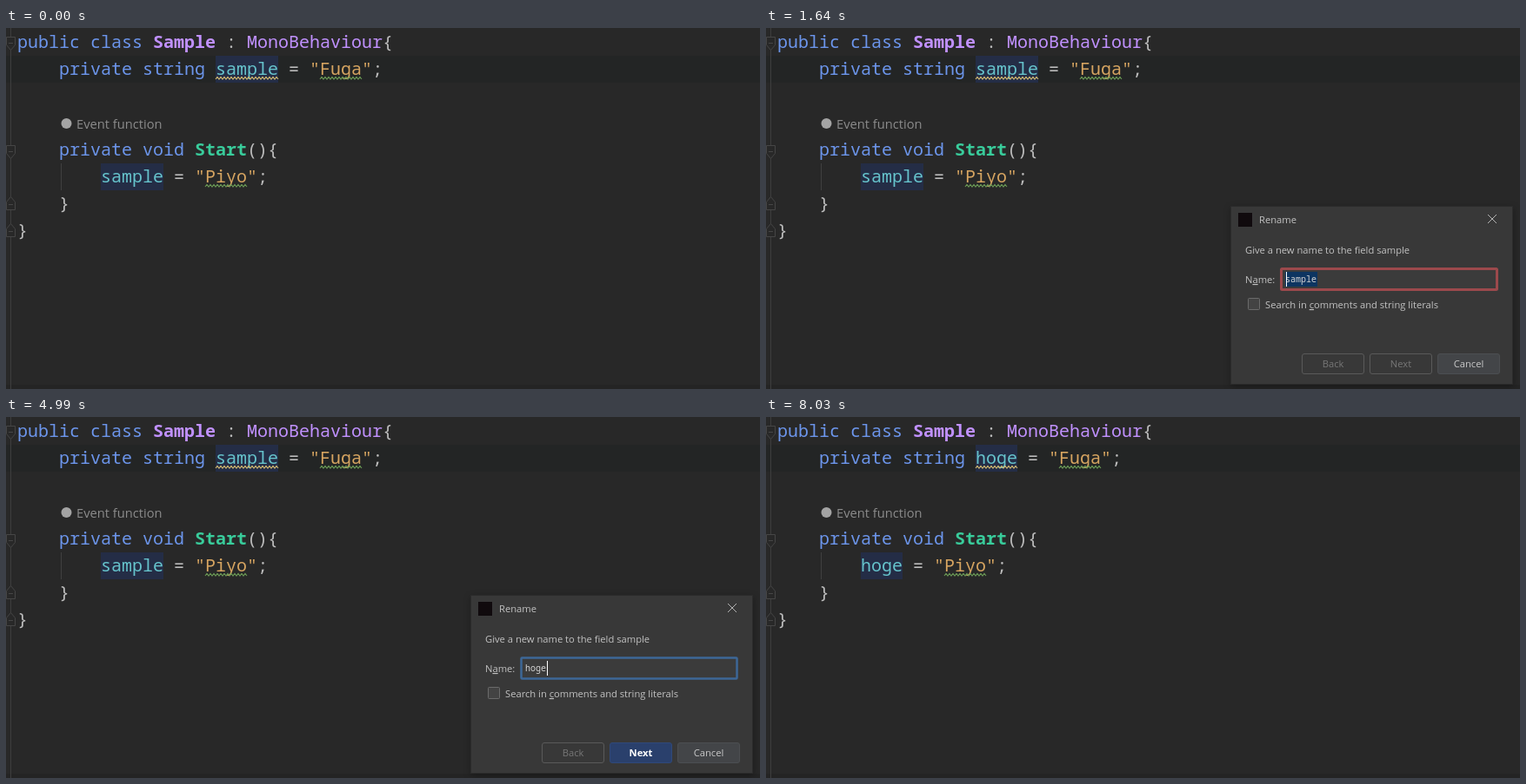
Animation, 867 px wide and 416 px high, one loop 8.34 s. Source, as an HTML page:

```html
<!DOCTYPE html>
<html lang="en">
<head>
<meta charset="utf-8">
<title>Rename refactoring</title>
<style>
  html, body { margin: 0; height: 100%; overflow: hidden; background: #282828; }
  svg { display: block; width: 100%; height: 100%; }
  text { white-space: pre; }
  .code { font: 500 20px "Noto Sans Mono", monospace; fill: #bdbdbd; }
  .kw { fill: #6c95eb; }
  .type { fill: #c191ff; }
  .method { fill: #39cc9b; }
  .field { fill: #66c3cc; }
  .str { fill: #d7a561; }
  .bold { font-weight: 700; }
  .hint { font: 14.7px "Open Sans", sans-serif; fill: #8c8c8c; }
  .ui { font: 11.2px "Open Sans", sans-serif; fill: #c2c2c2; }
  .mid { text-anchor: middle; }
  .input { font: 10px "Noto Sans Mono", monospace; fill: #d4d4d4; }
  .key { text-decoration: underline; }
  .panel { filter: drop-shadow(0 2px 4px rgba(0, 0, 0, .35)); }
</style>
</head>
<body>
<svg viewBox="0 0 867 416" preserveAspectRatio="none">
  <rect width="867" height="416" fill="#282828"/>
  <rect y="32" width="867" height="31" fill="#232525"/>
  <rect y="411" width="867" height="5" fill="#242424"/>
  <path d="M5.5 0V416" stroke="#3e3e3e"/>
  <path d="M63.5 156V187" stroke="#404040"/>
  <g id="folds" fill="#282828" stroke="#464646"></g>
  <circle cx="69.5" cy="110" r="6" fill="#a4a4a4"/>
  <text class="hint" x="81" y="116">Event function</text>
  <g id="before"></g>
  <g id="after"></g>
  <rect id="caret" x="240" y="35" width="2" height="25" fill="#fff"/>

  <g id="dialog">
    <rect class="panel" x="535" y="206" width="324" height="205" fill="#383838"/>
    <rect x="534.5" y="205.5" width="324" height="205" fill="none" stroke="#2b2b2b"/>
    <rect x="543" y="213" width="16" height="16" fill="#100a0d"/>
    <text class="ui" x="567" y="224.5">Rename</text>
    <path d="M830 215l10 10m0 -10l-10 10" stroke="#b4b4b4"/>
    <g id="form">
      <text class="ui" x="551" y="260">Give a new name to the field sample</text>
      <text class="ui" x="551" y="294">N<tspan class="key">a</tspan>me:</text>
      <rect id="box" x="592.5" y="277.5" width="248" height="24" rx="1" fill="#3b3b3b"/>
      <rect id="selection" x="597" y="281" width="37" height="17" fill="#0d3561"/>
      <text id="value" class="input" x="597" y="293"></text>
      <rect id="inputCaret" y="281" width="1" height="17" fill="#fff"/>
      <rect x="554.5" y="311.5" width="13" height="13" rx="1" fill="#434343" stroke="#6b6b6b"/>
      <text class="ui" x="574" y="323">Search in <tspan class="key">c</tspan>omments and string literals</text>
    </g>
    <g id="done">
      <text class="ui" x="547" y="363">Refactoring Succeeded</text>
      <rect x="548" y="366" width="297" height="4" fill="#1c1c1c"/>
    </g>
    <g id="buttons"></g>
  </g>
</svg>
<script>
const LOOP = 8340;
const $ = id => document.getElementById(id);
const show = (el, on) => el.setAttribute("display", on ? "inline" : "none");
const set = (el, attrs) => {
  for (const k in attrs) el.setAttribute(k, attrs[k]);
};

// Fold markers: top edge and pointing direction
const fold = (y, down) => {
  const shape = down
    ? `M.5 ${y}H10.5V${y + 9}L5.5 ${y + 15}L.5 ${y + 9}Z`
    : `M.5 ${y + 15}H10.5V${y + 6}L5.5 ${y}L.5 ${y + 6}Z`;
  return `<path d="${shape}"/><path d="M3 ${y + (down ? 7 : 9)}h5"/>`;
};
$("folds").innerHTML = fold(10.5, true) + fold(135.5, true) + fold(194.5, false) + fold(225.5, false);

const colX = col => 13 + col * 12;
const baseline = row => 23 + row * 31;

function line(row, col, parts) {
  let out = "";
  for (const [text, cls = ""] of parts) {
    out += `<text class="code ${cls}" x="${colX(col)}" y="${baseline(row)}">${text}</text>`;
    col += text.length;
  }
  return out;
}

function usage(col, row, len) {
  return `<rect x="${colX(col)}" y="${1 + row * 31}" width="${len * 12}" height="31" fill="#242d46"/>`;
}

// Zigzag underline, 4 px period
function wave(col, row, len, color) {
  const d = `M${colX(col)} ${baseline(row) + 5}` + "l2 -2.5l2 2.5".repeat(len * 3);
  return `<path d="${d}" fill="none" stroke="${color}" stroke-width="1.1"/>`;
}

function code(name) {
  const n = name.length;
  const green = "#6a9a55";
  return usage(19, 1, n) + usage(8, 5, n) +
    line(0, 0, [["public", "kw"], [" "], ["class", "kw"], [" "], ["Sample", "type bold"], [" : "], ["MonoBehaviour", "type"], ["{"]]) +
    line(1, 4, [["private", "kw"], [" "], ["string", "kw"], [" "], [name, "field"], [" = "], ['"Fuga"', "str"], [";"]]) +
    line(4, 4, [["private", "kw"], [" "], ["void", "kw"], [" "], ["Start", "method bold"], ["(){"]]) +
    line(5, 8, [[name, "field"], [" = "], ['"Piyo"', "str"], [";"]]) +
    line(6, 4, [["}"]]) + line(7, 0, [["}"]]) +
    wave(19, 1, n, "#d0b870") + wave(23 + n, 1, 4, green) + wave(12 + n, 5, 4, green);
}

$("before").innerHTML = code("sample");
$("after").innerHTML = code("hoge");

const button = (id, x, label, fill, stroke, color) =>
  `<g id="${id}"><rect x="${x + 0.5}" y="375.5" width="71" height="23" rx="2.5" fill="${fill}" stroke="${stroke}"/>` +
  `<text class="ui mid" x="${x + 36}" y="391" style="fill:${color}">${label}</text></g>`;
$("buttons").innerHTML =
  button("back", 616, "Back", "#383838", "#5a5a5a", "#777") +
  button("nextOff", 694, "Next", "#383838", "#5a5a5a", "#777") +
  button("nextOn", 694, "Next", "#2a406c", "#30497a", "#fff") +
  button("cancel", 772, "Cancel", "#434548", "#4c4f52", "#c8c8c8");
$("nextOn").lastChild.style.fontWeight = 700;

// Each row holds from its start time: [ms, opacity, scale]
const windowSteps = [
  [0, 0, 1], [1370, 0.3, 0.94], [1430, 0.66, 0.972], [1500, 0.88, 0.989], [1570, 0.97, 0.997],
  [1640, 1, 1], [6050, 0.55, 0.989], [6110, 0.2, 0.975], [6180, 0, 1]
];
const typed = [[0, "sample"], [4360, "h"], [4610, "ho"], [4790, "hog"], [4930, "hoge"]];
const editorBlink = [[240, 740], [1240, 1370], [6110, 7040], [7550, 8030]];
const inputBlink = [[1370, 1870], [2380, 2880], [3380, 3860], [4360, 5920]];

const at = (steps, t) => steps.filter(s => s[0] <= t).pop();
const within = (spans, t) => spans.some(([a, b]) => t >= a && t < b);

function render(t) {
  const [, alpha, scale] = at(windowSteps, t);
  const value = at(typed, t)[1];
  const editing = t >= 4360;
  const done = t >= 5990;

  show($("before"), !done);
  show($("after"), done);
  show($("caret"), within(editorBlink, t));

  show($("dialog"), alpha > 0);
  set($("dialog"), {
    opacity: alpha,
    transform: scale === 1 ? "" : `translate(697 308) scale(${scale}) translate(-697 -308)`
  });
  show($("form"), !done);
  show($("done"), done);
  show($("selection"), !editing);
  show($("nextOn"), editing && !done);
  show($("nextOff"), !editing || done);
  set($("box"), {
    stroke: editing ? "#3d6797" : "#9c494c",
    "stroke-width": editing ? 2.5 : 3
  });
  $("value").textContent = value;
  show($("inputCaret"), within(inputBlink, t));
  set($("inputCaret"), { x: 598 + (editing ? value.length * 6 : 0) });
}

function tick() {
  render(performance.now() % LOOP);
  requestAnimationFrame(tick);
}
tick();
</script>
</body>
</html>
```
